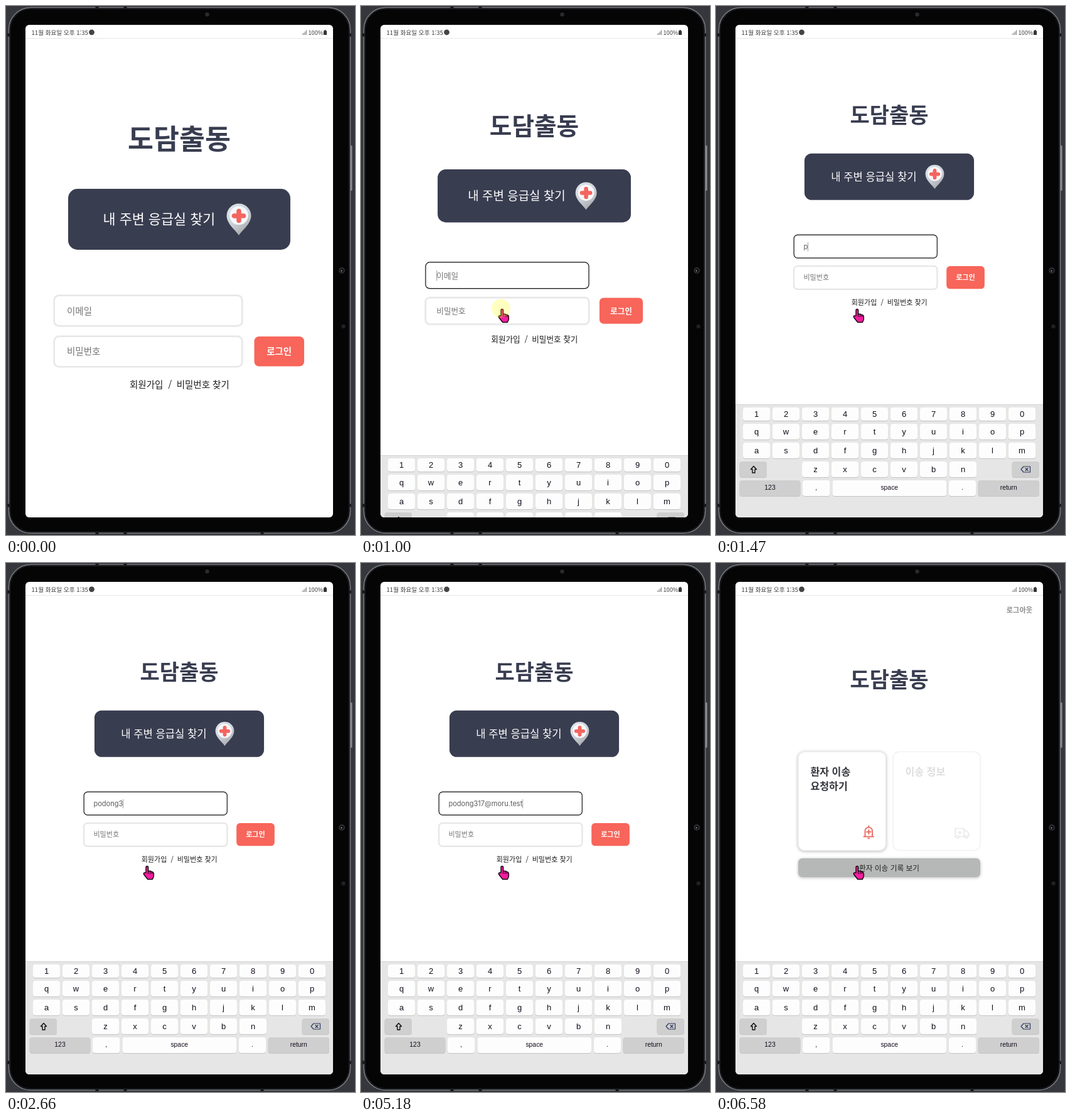
An HTML page for the animation above (6640 ms loop, 556 by 842 pixels).

```html
<!DOCTYPE html>
<html lang="ko">
<head>
<meta charset="utf-8">
<title>로그인</title>
<style>
html, body { margin: 0; width: 100%; height: 100%; overflow: hidden; background: #36373c; }
svg { display: block; width: 556px; height: 842px; }
text { font-family: "Noto Sans CJK KR", "Noto Sans CJK", "Noto Sans KR", sans-serif; white-space: pre; }
.mid { text-anchor: middle; }
.status { font-size: 9.6px; fill: #3c3c3c; font-weight: 300; }
.logo { font-size: 44.5px; font-weight: 900; fill: #393d50; text-anchor: middle; }
.body { font-size: 14.5px; }
.hint { fill: #757575; }
.typed { font-family: Inter, sans-serif; fill: #5c5c5c; }
.field { fill: #fff; stroke-width: 2; stroke: #e6e6e6; filter: drop-shadow(0 0 1px #ddd); }
.field.focus { stroke: #15151a; stroke-width: 1.2; }
.field, .card { vector-effect: non-scaling-stroke; }
.key { fill: #fdfdfd; filter: drop-shadow(0 1px .5px #c4c4c4); }
.key.dark { fill: #cfcfcf; }
.cap { font: 13px "Liberation Sans", Arial, sans-serif; fill: #150c1c; text-anchor: middle; }
.cap.small { font-size: 10.4px; }
.card { fill: #fff; stroke: #ececec; stroke-width: 1.5; }
.raised { filter: drop-shadow(0 1px 2.5px #bbb); }
.icon { fill: none; stroke-linejoin: round; stroke-linecap: round; }
</style>
</head>
<body>
<svg viewBox="0 0 556 842">
  <defs>
    <clipPath id="screen"><rect x="31" y="30" width="490" height="784" rx="6"/></clipPath>
    <linearGradient id="pinFill" x1="0" y1="0" x2=".6" y2="1">
      <stop offset="0" stop-color="#e2e7ec"/><stop offset=".6" stop-color="#c9cfd8"/><stop offset="1" stop-color="#a9a9a9"/>
    </linearGradient>
  </defs>

  <!-- tablet -->
  <rect width="556" height="842" fill="#36373c"/>
  <rect x="549" y="222" width="2.5" height="72" rx="1" fill="#8c8d92"/>
  <rect x="4.5" y="2.5" width="544" height="836.5" rx="35" fill="#050506" stroke="#7b7d83" stroke-width="1.6"/>
  <rect x="6.5" y="4.5" width="540" height="832.5" rx="33" fill="none" stroke="#1d1e21" stroke-width="1.5"/>
  <path d="M145 1v3M190 1v3M145 837v4M190 837v4M408 837v4M2 46h4M2 795h4M546 46h4M546 795h4" stroke="#17181a" stroke-width="5"/>
  <circle cx="320.5" cy="13.5" r="3.2" fill="#2a2b2e"/>
  <circle cx="535" cy="421" r="5" fill="#2c2d31"/>
  <circle cx="535" cy="421" r="2.8" fill="#090a0c"/>
  <circle cx="534.5" cy="421.5" r="1" fill="#b5b8be"/>
  <circle cx="537.5" cy="510" r="3.2" fill="#202124"/>

  <g clip-path="url(#screen)">
    <rect x="31" y="30" width="490" height="784" fill="#fff"/>

    <g id="login">
      <text class="logo" x="276" y="227.5">도담출동</text>
      <rect x="99" y="291" width="354" height="97" rx="15" fill="#393d50"/>
      <text x="154.5" y="347.4" font-size="21.8" font-weight="500" fill="#fff">내 주변 응급실 찾기</text>
      <path d="M371 365C367 358 351.5 347 351.5 334a19.5 19.5 0 0 1 39 0C390.5 347 375 358 371 365Z" fill="url(#pinFill)"/>
      <circle cx="371" cy="333.5" r="14.8" fill="#f7f8fa"/>
      <path d="M371 326.5v15M363.5 334h15" stroke="#f4655f" stroke-width="7.6" stroke-linecap="round"/>
      <rect id="mailBox" class="field" x="77" y="461" width="299" height="48" rx="7.5"/>
      <rect id="passBox" class="field" x="77" y="526" width="299" height="48" rx="7.5"/>
      <text id="mailHint" class="body hint" x="97" y="490.5">이메일</text>
      <text id="passHint" class="body hint" x="97" y="555">비밀번호</text>
      <text id="mail" class="body typed" x="97" y="490.5"></text>
      <g id="dots" fill="#4c4c4c"></g>
      <rect id="caret" width="1" height="19" fill="#8a8380"/>
      <rect x="395.5" y="526" width="79.5" height="47.5" rx="7.5" fill="#f8655a"/>
      <text id="loginLabel" class="body mid" x="435.2" y="555" font-weight="700" fill="#fff">로그인</text>
      <g class="body" fill="#1c1c1c" font-weight="500">
        <text id="joinLink" x="197" y="607.5">회원가입</text>
        <text class="mid" x="261.3" y="607.5">/</text>
        <text id="findLink" x="271.7" y="607.5">비밀번호 찾기</text>
      </g>
    </g>
    <g id="spinner" stroke="#2b1c1c" stroke-width="2" stroke-linecap="round"></g>

    <g id="home">
      <text x="504" y="79.3" font-size="11.2" font-weight="700" fill="#8c8c8c" text-anchor="end">로그아웃</text>
      <text class="logo" transform="translate(276 198.3) scale(.763)">도담출동</text>
      <rect class="card raised" x="131" y="300.5" width="139.5" height="157" rx="10"/>
      <rect class="card" x="282" y="300.5" width="139" height="157" rx="10" style="stroke:#f1f1f1"/>
      <g font-size="16.1" font-weight="700">
        <text x="150.5" y="337.5" fill="#35363c">환자 이송</text>
        <text x="150.5" y="360.5" fill="#35363c">요청하기</text>
        <text x="301.5" y="337.5" fill="#dedede">이송 정보</text>
      </g>
      <g class="icon" stroke="#e8716a" stroke-width="2">
        <path d="M235.5 435.5h15.5M237.5 435v-8.5a5.8 5.8 0 0 1 11.6 0v8.5M243.3 420.5v-2M243.3 424.8v6.4M240.1 428h6.4M242.3 438.3h2"/>
      </g>
      <g class="icon" stroke="#e9e9e9" stroke-width="1.7">
        <path d="M383 435.5h-2v-13h14v13h-8M395 426h4l3.5 4.5v5h-2M396.500 435.500h-2M386 429h5M388.500 426.500v5"/>
        <circle cx="385" cy="436" r="2"/><circle cx="398.500" cy="436" r="2"/>
      </g>
      <rect class="raised" x="131" y="470" width="290" height="30" rx="6.5" fill="#b5b8b7"/>
      <text class="mid" x="276" y="489.600" font-size="11.700" font-weight="500" fill="#222">환자 이송 기록 보기</text>
    </g>

    <g id="keyboard">
      <rect x="31" width="490" height="181" fill="#e6e6e6"/>
      <path d="M31 .5h490" stroke="#d2d2d2"/>
      <g id="keys"></g>
      <path class="icon" d="M60 98.500l4.500 5h-2.500v5.500h-4v-5.500h-2.500Z" stroke="#111" stroke-width="1.400"/>
      <path class="icon" d="M486 103.500l4-4.500h10.500v9H490ZM493 101.500l4 4M497 101.500l-4 4" stroke="#2c3a5c" stroke-width="1.200"/>
    </g>

    <path d="M31 51.500h490" stroke="#e6e6e6"/>
    <text class="status" x="40.500" y="45.700">11월 화요일 오후 1:35</text>
    <circle cx="136.500" cy="41.800" r="4.400" fill="#444"/>
    <path d="M472.500 46v-2M474.500 46v-3.500M476.500 46v-5.500M478.500 46v-7.500" stroke="#777"/>
    <text class="status" x="481.500" y="45.700" style="font-size:9.200px">100%</text>
    <path d="M506 39.500h1.500v-1.500h2v1.500h1.500v6.500h-5Z" fill="#333"/>

    <g id="hand">
      <path d="M223 493v-8.500q0-2 1.800-2t1.800 2v6q4-.8 5.500 1 2.800 0 3.200 3v4.500l-2 4.500h-7.500l-6-7.500q-1.300-2.500.8-3Z" fill="#f41ca0" stroke="#170812" stroke-width="1.500" stroke-linejoin="round"/>
      <path d="M226.600 490.500v4.500M229.600 491.500v3.500M232.400 492v3" stroke="#170812" stroke-width="1.100"/>
    </g>
    <circle id="tap" cx="223" cy="481.500" r="15" fill="#ff0"/>
  </g>
</svg>
<script>
const LOOP = 6640;
const MAIL = "podong317@moru.test";
const MAIL_TIMES = [1470, 1800, 1870, 2060, 2130, 2190, 2660, 2920, 3120, 3590,
                    4120, 4190, 4310, 4510, 4650, 4710, 4840, 5110, 5180];
const DOT_TIMES = [5570, 5710, 5770, 5840];
const HAND_STEPS = [[460, 1], [530, .8], [600, .54], [660, .3], [730, .1], [790, 0]];
const KEYBOARD_STEPS = [[0, 0], [1000, .55], [1070, .922], [1140, 1]];

const $ = id => document.getElementById(id);
const add = (parent, tag, attrs, label) => {
  const el = document.createElementNS("http://www.w3.org/2000/svg", tag);
  for (const name in attrs) el.setAttribute(name, attrs[name]);
  if (label) el.textContent = label;
  return parent.appendChild(el);
};
const set = (id, name, value) => $(id).setAttribute(name, value);
const show = (id, on) => { $(id).style.display = on ? "" : "none"; };
const count = (times, t) => times.filter(time => time <= t).length;
const stepAt = (steps, t) => steps.reduce((value, [time, next]) => time <= t ? next : value, steps[0][1]);

function addKey(x, y, width, height, label, dark, small) {
  add($("keys"), "rect", { class: dark ? "key dark" : "key", x, y, width, height, rx: 4 });
  add($("keys"), "text", { class: small ? "cap small" : "cap", x: x + width / 2, y: y + height / 2 + (small ? 2.5 : 4.7) }, label);
}
[["1234567890", 0, 5, 21], ["qwertyuiop", 0, 31, 25], ["asdfghjklm", 0, 61, 25], ["zxcvbn", 2, 91, 25]]
  .forEach(([letters, first, y, height]) =>
    [...letters].forEach((letter, i) => addKey(43 + 47 * (first + i), y, 43, height, letter)));
addKey(37.5, 91, 43.5, 25, "", true);
addKey(471.5, 91, 43.5, 25, "", true);
[[37.5, 97, "123", true], [138, 43.5, ","], [185.5, 181.5, "space"], [371, 43, "."], [417.5, 97.5, "return", true]]
  .forEach(([x, width, label, dark]) => addKey(x, 121, width, 25, label, dark, true));

const spokes = Array.from({ length: 12 }, (_, i) =>
  add($("spinner"), "path", { d: "M0-7.500v-4.500", transform: `translate(398.200 435) rotate(${i * 30})` }));
const dots = DOT_TIMES.map((_, i) => add($("dots"), "circle", { cx: 99.7 + 6.2 * i, cy: 550.3, r: 2.1 }));

function render(t) {
  const home = t >= 6180;
  const loading = t >= 5980 && !home;
  show("login", !home);
  show("home", home);
  show("spinner", loading);
  show("loginLabel", !loading);

  const open = stepAt(KEYBOARD_STEPS, t);
  set("login", "transform", `translate(276 53.7) scale(${1 - .237 * open}) translate(-276 -53.7)`);
  set("keyboard", "transform", `translate(0 ${814 - 180 * open})`);
  show("keyboard", open > 0);

  const onMail = t >= 930 && t < 5380;
  const onPass = t >= 5380;
  $("mailBox").classList.toggle("focus", onMail);
  $("passBox").classList.toggle("focus", onPass);

  const letters = count(MAIL_TIMES, t);
  const dotCount = count(DOT_TIMES, t);
  $("mail").textContent = MAIL.slice(0, letters);
  show("mailHint", !letters);
  show("passHint", !dotCount);
  dots.forEach((dot, i) => { dot.style.display = i < dotCount ? "" : "none"; });

  show("caret", onMail || onPass);
  const typedWidth = onPass ? dotCount * 6.2 : letters && !home ? $("mail").getComputedTextLength() : 0;
  set("caret", "x", 97 + typedWidth);
  set("caret", "y", onPass ? 540.5 : 476);

  const away = stepAt(HAND_STEPS, t);
  show("hand", t >= 460);
  set("hand", "transform", `translate(${124 * away} ${116 * away})`);
  set("findLink", "text-decoration", t >= 460 && t < 530 ? "underline" : "none");
  set("joinLink", "text-decoration", t >= 1070 && t < 1140 ? "underline" : "none");
  show("tap", t >= 930 && t < 1070);
  set("tap", "opacity", t < 1000 ? .52 : .25);

  const head = Math.floor((t - 6050) / 65) + 12;
  spokes.forEach((spoke, i) => set.call(null, "spinner", "opacity", 1) ||
    spoke.setAttribute("opacity", 1 - .075 * ((head - i + 24) % 12)));
}

const start = performance.now();
function frame() {
  render((performance.now() - start) % LOOP);
  requestAnimationFrame(frame);
}
frame();
</script>
</body>
</html>
```
